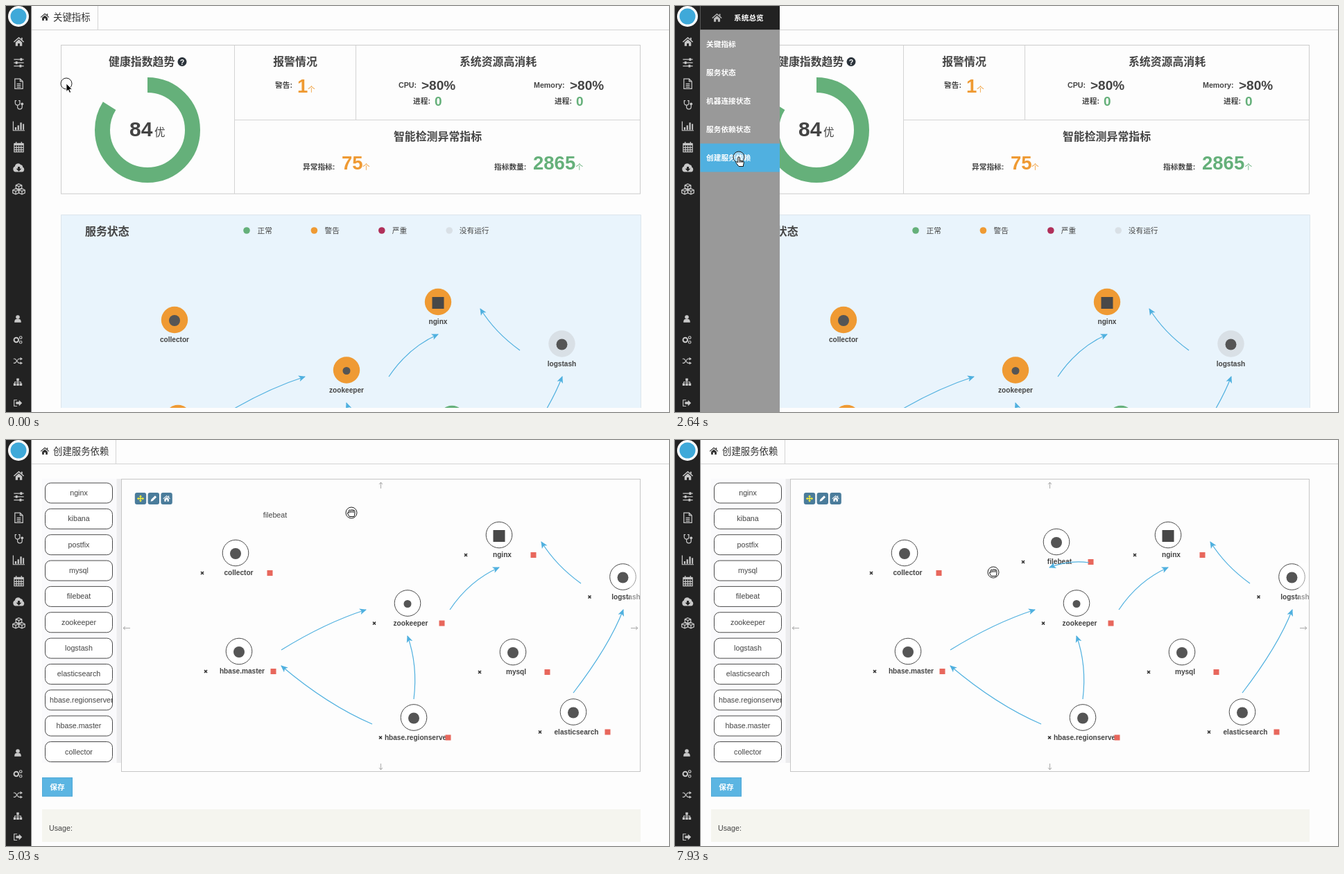
An HTML page for the animation above (7990 ms loop, 956 by 586 pixels).

```html
<!DOCTYPE html>
<html lang="zh">
<head>
<meta charset="utf-8">
<title>服务依赖</title>
<style>
html, body { margin: 0; width: 100%; height: 100%; overflow: hidden; background: #fdfdfd; }
svg { display: block; font-family: "Liberation Sans", "Noto Sans CJK SC", "Noto Sans CJK", sans-serif; }
text { fill: #444; font-size: 10.7px; }
.b { font-weight: bold; }
.h { font-weight: bold; font-size: 15.9px; }
.mid { text-anchor: middle; }
.tab { font-size: 13.4px; fill: #333; }
.big { font-weight: bold; font-size: 27.5px; }
.val { font-weight: bold; font-size: 19px; }
.name { font-weight: bold; font-size: 10.1px; text-anchor: middle; }
.green { fill: #65b07a; }
.orange { fill: #ef9a33; }
.white { fill: #fff; }
.line { fill: none; stroke: #d4d4d4; }
.edge { fill: none; stroke: #4fb0df; stroke-width: 1.2; marker-end: url(#head); }
.icon { fill: currentColor; fill-rule: evenodd; }
.icon + .stroke, .stroke { fill: none; stroke: currentColor; stroke-width: 1.3; }
</style>
</head>
<body>
<svg id="stage" width="956" height="586" viewBox="0 0 956 586">
  <defs>
    <marker id="head" orient="auto" markerUnits="userSpaceOnUse" markerWidth="10" markerHeight="10" overflow="visible">
      <path d="M1 0-9-4.5-6.5 0-9 4.5Z" fill="#4fb0df"/>
    </marker>
    <clipPath id="clipStatus"><rect x="79" y="301" width="836" height="279"/></clipPath>
    <clipPath id="clipCanvas"><rect x="167" y="57" width="747" height="421"/></clipPath>
    <clipPath id="clipList"><rect x="57" y="57" width="97" height="410"/></clipPath>
  </defs>
  <rect width="956" height="586" fill="#fdfdfd"/>
  <path class="line" d="M37 34.5H956"/>

  <g id="overview">
    <g class="homeSlot" transform="translate(56 16) scale(.78)" color="#333"></g>
    <text class="tab" x="68" y="21">关键指标</text>
    <path class="line" d="M132.5 0V34M329.5 57V271M504.5 57V164M330 164.5H915"/>
    <rect class="line" x="79.5" y="56.5" width="835" height="214.5" style="stroke:#ccc"/>

    <text class="h" x="148" y="86">健康指数趋势</text>
    <circle cx="254" cy="80.5" r="6.5" fill="#2b333b"/>
    <text class="b mid white" x="254" y="84.5">?</text>
    <circle cx="204" cy="179" r="65" fill="none" stroke="#65b07a" stroke-width="22"
      pathLength="100" stroke-dasharray="84 16" transform="rotate(-90 204 179)"/>
    <text class="b" x="178" y="188" style="font-size:30px">84</text>
    <text x="214" y="188" style="font-size:15.5px">优</text>

    <text class="h mid" x="417" y="86">报警情况</text>
    <text class="b" x="388" y="118">警告:</text>
    <text class="big orange" x="420" y="125">1</text>
    <text class="orange" x="435" y="124">个</text>

    <text class="h mid" x="709.5" y="86">系统资源高消耗</text>
    <text class="b" x="566" y="118">CPU:</text>
    <text class="val" x="599" y="121">&gt;80%</text>
    <text class="b" x="587" y="141">进程:</text>
    <text class="val green" x="618" y="144">0</text>
    <text class="b" x="761" y="118">Memory:</text>
    <text class="val" x="813" y="121">&gt;80%</text>
    <text class="b" x="791" y="141">进程:</text>
    <text class="val green" x="822" y="144">0</text>

    <text class="h mid" x="622.5" y="194">智能检测异常指标</text>
    <text class="b" x="428" y="236">异常指标:</text>
    <text class="big orange" x="484" y="236">75</text>
    <text class="orange" x="514" y="236">个</text>
    <text class="b" x="704" y="236">指标数量:</text>
    <text class="big green" x="760" y="236">2865</text>
    <text class="green" x="821.5" y="236">个</text>

    <rect x="79" y="301" width="836" height="279" fill="#e9f4fc"/>
    <path class="line" d="M79.5 580V301.5H915.5V580" style="stroke:#dce5ec"/>
    <text class="h" x="114" y="330.5">服务状态</text>
    <g id="legend"></g>
    <g clip-path="url(#clipStatus)"><g id="statusGraph" transform="translate(-88 290)"></g></g>
  </g>

  <g id="editor">
    <g class="homeSlot" transform="translate(56 16) scale(.78)" color="#333"></g>
    <text class="tab" x="68" y="21">创建服务依赖</text>
    <path class="line" d="M158.5 0V34"/>
    <g id="list">
      <rect x="52" y="56" width="107" height="410" fill="#fafafc"/>
      <rect x="159.5" y="56" width="6.5" height="410" fill="#ececee"/>
      <g id="items" clip-path="url(#clipList)"></g>
    </g>
    <rect class="line" x="166.5" y="56.5" width="748" height="422" style="stroke:#c6c6c6"/>
    <path d="M540.5 70V61M538 64l2.5-3 2.5 3M540.5 467V476M538 473l2.5 3 2.5-3M179 271.5H169M172 269l-3 2.5 3 2.5M901 271.5H911M908 269l3 2.5-3 2.5" fill="none" stroke="#aaa"/>
    <g id="tools" fill="#4a7c9b"></g>
    <g clip-path="url(#clipCanvas)">
      <g id="edges"></g>
      <g id="nodes"></g>
      <g id="added"></g>
    </g>
    <path id="link" class="edge" d="M597 177Q570 173 540 184"/>
    <rect x="52" y="487" width="44" height="27.5" fill="#5bb5e2"/>
    <rect x="52.5" y="487.5" width="43" height="26.5" fill="none" stroke="#4ea9d8"/>
    <text class="b mid white" x="74" y="505">保存</text>
    <rect x="52" y="533" width="863" height="47" fill="#f5f5ef"/>
    <text x="62" y="564">Usage:</text>
  </g>

  <rect width="36.5" height="586" fill="#222"/>
  <g id="sidebar" color="#c8c8c8"></g>
  <g id="menu">
    <rect x="36.5" width="114.5" height="34.5" fill="#222"/>
    <rect x="36.5" y="34.5" width="114.5" height="552" fill="#999"/>
    <rect id="hover" x="36.5" y="34.5" width="114.5" height="41" fill="#50b0e0"/>
    <g class="homeSlot" transform="translate(60.5 17) scale(.9)" color="#bbb"></g>
    <text class="b white" x="85" y="21">系统总览</text>
    <g id="menuItems"></g>
  </g>
  <circle cx="18" cy="15" r="15" fill="#fff"/>
  <circle cx="18" cy="15" r="11.5" fill="#3fa9d9"/>

  <text id="ghost" class="mid" y="4">filebeat</text>
  <g id="cursor">
    <circle id="ring" r="8" fill="#fff" fill-opacity=".45" stroke="#222"/>
    <path id="arrow" d="M0 0V11.5L2.7 9 4.6 13.3 6.6 12.4 4.7 8.2H8.3Z" stroke="#fff" stroke-width=".8"/>
    <path id="hand" d="M-1.2 8V1a1.2 1.2 0 0 1 2.4 0V5l5 1.2q1.2.4 1.1 1.8l-.8 4v1.5H0L-3.8 8.6q-.6-1.2.4-1.6Q-2.4 6.7-1.2 8ZM1.2 5V8M3.3 5.5V8M5.3 6V8" fill="#fff" stroke="#111"/>
    <path id="grab" d="M-3 5.5-5.5 1q-.5-1.5 1-1.3l1 .7V-3.5q1-1.5 2 0 1-2 2.2-.3 1.2-1.4 2.2.3 1.4-.8 2 .7V2L4 5.5ZM-1.5-3.5V0M.7-3.8V0M2.9-3.5V0" fill="#fff" stroke="#111"/>
    <path id="move" stroke="#fff" stroke-width="1" paint-order="stroke"/>
  </g>
</svg>
<script>
const LOOP = 7990;
const $ = id => document.getElementById(id);
const fill = (id, html) => { $(id).innerHTML = html; };

// Icons are [filled path, stroked path], centred on 0,0.
const cube = (x, y) => `M${x} ${y}l4.5 2v4.5l-4.5 2-4.5-2v-4.5zm-4.5 2 4.5 2 4.5-2m-4.5 2v4.5`;
const ring = (x, y, r) => `M${x - r} ${y}a${r} ${r} 0 0 1 ${2 * r} 0a${r} ${r} 0 0 1 ${-2 * r} 0`;
const ICONS = {
  home: ['M-8 0 0-7 8 0 7 1 0-5-7 1ZM-5 1 0-3.3 5 1V6.5H1.5V2.5H-1.5V6.5H-5ZM3.5-6H5.5V-2.5L3.5-4.3Z', ''],
  sliders: ['M2-7h3v4h-3zM-5-2h3v4h-3zM1 3h3v4h-3z', 'M-7.5-5H7.5M-7.5 0H7.5M-7.5 5H7.5'],
  file: ['', 'M-6-7.5H2L6-3.5V7.5H-6ZM2-7.5V-3.5H6M-3 0H3M-3 2.5H3M-3 5H3'],
  scope: [ring(5, -1.5, 2), 'M-3.5-6.5H-5.5V-3a3.5 3.5 0 0 0 7 0V-6.5H-.5M-2 .5V3a3.5 3.5 0 0 0 7 0V0'],
  chart: ['M-6 2h2.4v4h-2.4zM-2-1h2.4v7h-2.4zM2-5h2.4v11h-2.4zM6-3h2v9h-2z', 'M-8.5-7V7H9'],
  calendar: ['M-7-6H7V-2.5H-7Z', 'M-7-5H7V7.5H-7ZM-7 1H7M-7 4.3H7M-3.5-2V7M0-2V7M3.5-2V7M-4-8V-4M4-8V-4'],
  cloud: ['M-5 6a4.5 4.5 0 0 1-1-8.5 5 5 0 0 1 9-2.5 3.5 3.5 0 0 1 3 3.5 4 4 0 0 1-1 7.5ZM-1.5-2H1.5V1H4L0 5-4 1H-1.5Z', ''],
  cubes: ['', cube(0, -8) + cube(-4.7, -.7) + cube(4.7, -.7)],
  user: [ring(0, -2.8, 3.2) + 'M-5.5 6c0-4 1.5-5.5 3-5.5h5c1.5 0 3 1.5 3 5.5Z', ''],
  cogs: ['', [3.2, 4.2].map(r => ring(-2.5, 0, r)).join('') + ring(4.8, -3.8, 2) + ring(4.8, 3.8, 2)],
  shuffle: ['M4-6 8-3.5 4-1ZM4 1 8 3.5 4 6Z', 'M-7-3.5H-4.5L1.5 3.5H5M-7 3.5H-4.5L1.5-3.5H5'],
  sitemap: ['M-2-6h4v4h-4zM-7 2h4v4h-4zM-2 2h4v4h-4zM3 2h4v4h-4z', 'M0-2V2M-5 2V0H5V2'],
  exit: ['M-3-2H2V-5L7 0 2 5V2H-3Z', 'M-1-5H-6V5H-1'],
  pencil: ['M-5 5-4 1.5 2.5-5 5-2.5-1.5 4Z', ''],
  move: ['M0-6 2.5-3.2H.8V-.8H3.2V-2.5L6 0 3.2 2.5V.8H.8V3.2H2.5L0 6-2.5 3.2H-.8V.8H-3.2V2.5L-6 0-3.2-2.5V-.8H-.8V-3.2H-2.5Z', '']
};
const glyph = name => `<path class="icon" d="${ICONS[name][0]}"/><path class="stroke" d="${ICONS[name][1]}"/>`;
const icon = (name, x, y, scale = 1, color = 'inherit') =>
  `<g transform="translate(${x} ${y}) scale(${scale})" style="color:${color}">${glyph(name)}</g>`;

document.querySelectorAll('.homeSlot').forEach(g => { g.innerHTML = glyph('home'); });
$('move').setAttribute('d', ICONS.move[0]);

const upper = ['home', 'sliders', 'file', 'scope', 'chart', 'calendar', 'cloud', 'cubes'];
const lower = ['user', 'cogs', 'shuffle', 'sitemap', 'exit'];
fill('sidebar', upper.map((n, i) => icon(n, 18.5, 51.5 + i * 30.4, .95)).join('') +
  lower.map((n, i) => icon(n, 17, 451.5 + i * 30.4, .88)).join(''));

fill('tools', [['move', '#f4ee3a'], ['pencil', '#fff'], ['home', '#fff']].map(([n, c], i) => {
  const x = 194 + i * 18.8;
  return `<rect x="${x - 8.2}" y="76" width="16.4" height="17" rx="3"/>` + icon(n, x, 84.5, n === 'home' ? .65 : .85, c);
}).join(''));

fill('legend', [['#65b07a', '正常'], ['#ef9a33', '警告'], ['#b0305a', '严重'], ['#d9e0e6', '没有运行']].map(([c, s], i) =>
  `<circle cx="${347 + i * 97.4}" cy="324" r="4.8" fill="${c}"/><text x="${362.5 + i * 97.1}" y="328">${s}</text>`).join(''));

fill('menuItems', ['关键指标', '服务状态', '机器连接状态', '服务依赖状态', '创建服务依赖'].map((s, i) =>
  `<text class="b white" x="45" y="${59 + i * 41}">${s}</text>`).join(''));

const services = ['nginx', 'kibana', 'postfix', 'mysql', 'filebeat', 'zookeeper', 'logstash',
  'elasticsearch', 'hbase.regionserver', 'hbase.master', 'collector'];
fill('items', services.map((s, i) => {
  const y = 62 + i * 37.35, long = s.length > 16;
  return `<text class="${long ? '' : 'mid'}" x="${long ? 63 : 105}" y="${y + 18}">${s}</text>`;
}).join(''));
$('items').insertAdjacentHTML('beforebegin', services.map((s, i) =>
  `<rect x="56.5" y="${62 + i * 37.35}" width="97" height="29" rx="8" fill="#fff" stroke="#4a4a4a"/>`).join(''));

const NODES = [
  ['collector', 331, 163, '#ef9a33', 'dot'],
  ['nginx', 711, 137, '#ef9a33', 'square'],
  ['logstash', 889.5, 197.5, '#d9e0e6', 'dot'],
  ['zookeeper', 579, 235.5, '#ef9a33', 'small'],
  ['mysql', 731, 306, '#65b07a', 'dot'],
  ['hbase.master', 336, 305, '#ef9a33', 'dot'],
  ['hbase.regionserver', 588, 400.5, '#65b07a', 'dot'],
  ['elasticsearch', 818, 392.5, '#65b07a', 'dot']
];
const EDGES = ['M397 303Q460 264 519 245', 'M528 410Q463 382 397 326', 'M588 374Q594 325 579 283',
  'M640 245Q668 203 711 184', 'M829 207Q793 181 772 147', 'M818 365Q870 297 890 245'];

const badge = (x, y, kind) => kind === 'square'
  ? `<rect x="${x - 8.5}" y="${y - 7}" width="17" height="17" fill="#484848"/>`
  : `<circle cx="${x}" cy="${y + 1}" r="${kind === 'small' ? 5.5 : 8}" fill="#555"/>`;
const statusNode = ([name, x, y, color, kind]) =>
  `<circle cx="${x}" cy="${y}" r="19.2" fill="${color}"/>${badge(x, y, kind)}<text class="name" x="${x}" y="${y + 32}">${name}</text>`;
const editNode = ([name, x, y, , kind]) =>
  `<circle cx="${x}" cy="${y}" r="18.8" fill="#fff" stroke="#4a4a4a"/>${badge(x, y, kind)}
   <text class="name" x="${x + 4.5}" y="${y + 32}">${name}</text>
   <path d="M${x - 50} ${y + 27}l4 4m0-4l-4 4" stroke="#333" stroke-width="1.6"/>
   <rect x="${x + 45.5}" y="${y + 25}" width="8" height="8" fill="#e8675c"/>`;
const edgePaths = EDGES.map(d => `<path class="edge" d="${d}"/>`).join('');

fill('statusGraph', edgePaths + NODES.map(statusNode).join(''));
fill('edges', edgePaths);
fill('nodes', NODES.map(editNode).join('') + '<rect x="899" y="178" width="15" height="56" fill="#fff" opacity=".45"/>');
fill('added', editNode(['filebeat', 550, 147, '', 'dot']));

// Timeline: times are in ms within one loop.
function animate(id, frames) {
  const last = frames[frames.length - 1];
  const keys = [...frames, [LOOP, last[1]]].map(([t, css, easing = 'linear']) => ({ offset: t / LOOP, easing, ...css }));
  $(id).animate(keys, { duration: LOOP, iterations: Infinity });
}
function show(id, ...spans) {
  const frames = spans[0][0] > 0 ? [[0, { opacity: 0 }, 'step-end']] : [];
  for (const [from, to = LOOP] of spans) {
    frames.push([from, { opacity: 1 }, 'step-end']);
    if (to < LOOP) frames.push([to, { opacity: 0 }, 'step-end']);
  }
  animate(id, frames);
}
// Each stop is [time, x, y, steps to the next stop].
const track = (id, stops) => animate(id, stops.map(([t, x, y, n = 1]) =>
  [t, { transform: `translate(${x}px, ${y}px)` }, `steps(${n})`]));

show('overview', [0, 2650]);
show('menu', [1150, 2650]);
show('hover', [1690, 2650]);
track('hover', [[0, 0, 0], [1730, 0, 41], [1780, 0, 82], [1846, 0, 123], [1980, 0, 164]]);
show('editor', [2650]);
show('list', [2820]);
show('nodes', [3000]);
show('edges', [3230]);
show('ghost', [4750, 5580]);
show('added', [5580]);
show('link', [7505]);

show('ring', [0, 50], [1100, 1150], [2590, 2650], [4070, 5580], [7240]);
show('arrow', [0, 690], [2650, 3350]);
show('hand', [690, 2650], [3350, 4750], [7070, 7420]);
show('grab', [4750, 5580], [7420]);
show('move', [5580, 7070]);

track('cursor', [
  [0, 87, 112], [354, 87, 112, 8], [800, 20, 51],
  [1570, 20, 51, 4], [1780, 94, 172, 5], [2110, 92, 218],
  [4690, 92, 218, 6], [5030, 498, 105, 8], [5530, 552, 139],
  [6440, 552, 139, 12], [7130, 603, 177],
  [7420, 603, 177, 5], [7870, 540, 184], [7930, 459, 191]
]);
track('ghost', [[0, 105, 226], [4750, 105, 226, 5], [5030, 388, 108, 8], [5530, 538, 134]]);

const link = (x, y) => ({ d: `path("M597 177Q${(597 + x) / 2} 173 ${x} ${y}")` });
animate('link', [[0, link(590, 177)], [7505, link(590, 177), 'steps(5)'], [7930, link(540, 184)]]);
</script>
</body>
</html>
```
